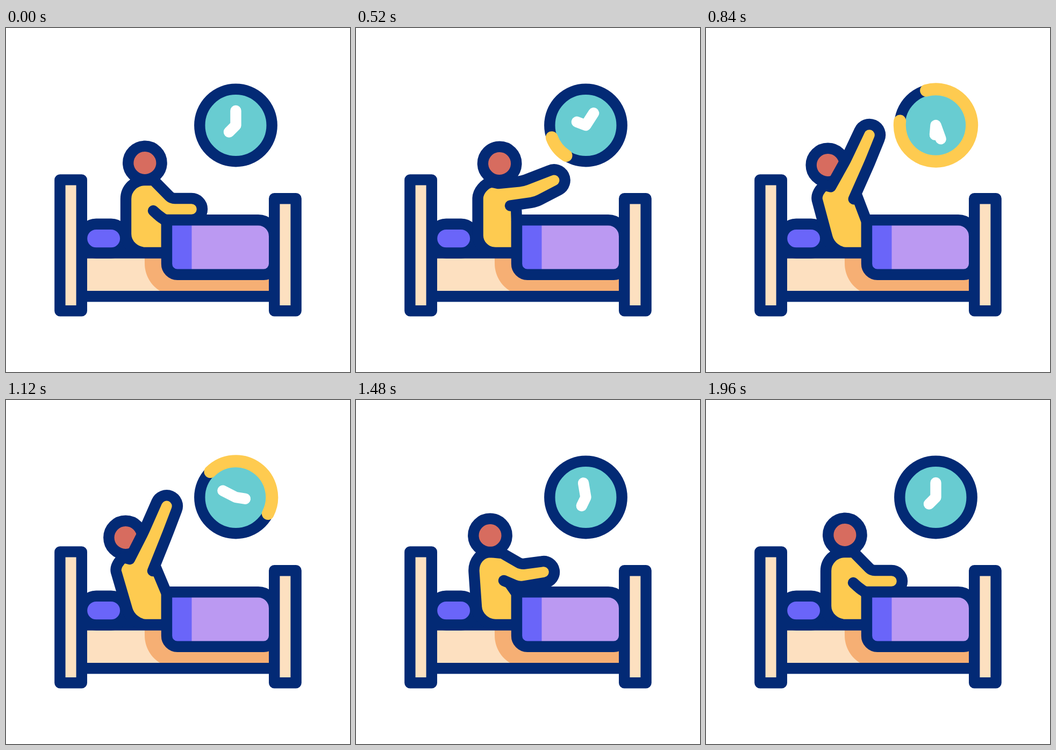
Animation of 640x640 px, one loop 2.04 s. Source, as an HTML page:

```html
<!DOCTYPE html>
<html lang="en">
<head>
<meta charset="utf-8">
<title>Good morning</title>
<style>
  html, body { margin: 0; width: 100%; height: 100%; overflow: hidden; background: #fff; }
  svg { display: block; width: 100%; height: 100%; }
  .line { stroke: #032a75; stroke-width: 20.4; stroke-linecap: round; stroke-linejoin: round; }
</style>
</head>
<body>
<svg viewBox="0 0 640 640">
  <!-- clock -->
  <circle class="line" cx="427.5" cy="181" r="67.2" fill="#68ccd1"/>
  <path id="ring" fill="none" stroke="#fecb50" stroke-width="23" stroke-linecap="round"/>
  <path id="hands" fill="none" stroke="#fff" stroke-width="20.4" stroke-linecap="round" stroke-linejoin="round"/>

  <!-- mattress and pillow -->
  <path fill="#fde0c0" d="M145 425H495V495H145Z"/>
  <path fill="#f6af74" d="M258 425V438C258 460 270 480 288 490H495V425Z"/>
  <path class="line" d="M145 499.3H495M145 418.5H299"/>
  <rect class="line" x="141" y="364.8" width="81.3" height="53.7" rx="26.8" fill="#6a65f9"/>

  <circle id="head" class="line" r="31.2" fill="#d76c5f"/>
  <path id="body" class="line" fill="#fecb50"/>

  <!-- blanket -->
  <path fill="#bb99f2" d="M299 357H469A30 30 0 0 1 499 387V459H299Z"/>
  <path fill="#6a65f9" d="M299 357H345.5V459H319L299 439Z"/>
  <path class="line" fill="none" d="M299 357.3H469A30 30 0 0 1 499.2 387.5V438.6A20 20 0 0 1 479 458.8H319A20 20 0 0 1 299 438.6Z"/>

  <!-- head and foot boards -->
  <rect class="line" x="100.4" y="282.4" width="40.4" height="243.8" fill="#fde0c0"/>
  <rect class="line" x="499.2" y="317.2" width="40.4" height="209" fill="#fde0c0"/>
</svg>
<script>
const LOOP = 2040, STEP = 40;
const $ = id => document.getElementById(id);
const mix = (a, b, k) => a + (b - a) * k;
const mixPt = (a, b, k) => [mix(a[0], b[0], k), mix(a[1], b[1], k)];
const polar = ([x, y], r, a) => [x + r * Math.cos(a), y + r * Math.sin(a)];
const toward = (a, b, d) => mixPt(a, b, d / Math.hypot(b[0] - a[0], b[1] - a[1]));
const str = p => p.map(v => v.toFixed(2)).join(' ');
const rad = deg => deg * Math.PI / 180;

// Smooth curve through keys that never overshoots them
function track(times, values) {
  const n = times.length;
  const h = i => times[i + 1] - times[i];
  const rate = i => (values[i + 1] - values[i]) / h(i);
  const slopes = values.map((_, i) => {
    if (!i || i === n - 1) return 0;
    const a = rate(i - 1), b = rate(i);
    if (a * b <= 0) return 0;
    const m = (a * h(i) + b * h(i - 1)) / (h(i) + h(i - 1));
    return Math.sign(m) * Math.min(Math.abs(m), 3 * Math.abs(a), 3 * Math.abs(b));
  });
  return t => {
    if (t >= times[n - 1]) return values[n - 1];
    let i = 0;
    while (t >= times[i + 1]) i++;
    const w = h(i), s = (t - times[i]) / w, r = 1 - s;
    return values[i] * r * r * (1 + 2 * s) + slopes[i] * w * s * r * r
         + values[i + 1] * s * s * (3 - 2 * s) - slopes[i + 1] * w * s * s * r;
  };
}

function smooth(from, to, t) {
  const s = Math.min(1, Math.max(0, (t - from) / (to - from)));
  return s * s * (3 - 2 * s);
}

// head, hip, back, shoulder corner, nape, arm root, armpit, elbow, hand, under-elbow, forearm angle
const rest   = [258.4, 251, 223, 383, 223, 318, 223, 283, 258, 283, 274.5, 283, 274, 340, 308, 317, 345, 337, 293, 357, 0];
const lean   = [281, 253, 227, 382, 235, 313, 238, 283, 269, 283, 284, 285.5, 289, 341, 321, 314, 360, 337, 311, 354, 4];
const reach  = [244.3, 251, 226, 390, 214, 320, 212, 303, 229, 291, 240, 293, 282, 319, 272, 254, 324, 207, 320, 260, -63];
const back   = [222.5, 256, 225.5, 390, 205, 320, 201, 304, 219, 293, 230, 296, 273, 318, 256, 245, 299, 197, 301, 248, -67];
const settle = [249.5, 252, 224, 385, 219.5, 320, 217, 283, 250, 283, 272, 285, 275, 336, 307.5, 305.5, 349, 320, 303, 348, -9.5];

const pivotOf = p => [(p[10] + p[12]) / 2, (p[11] + p[13]) / 2];

// The arm swings, so its joints are kept as radius and angle about the shoulder
function swing(pose) {
  const p = pose.slice(), [px, py] = pivotOf(p);
  for (let i = 14; i < 20; i += 2) {
    const dx = pose[i] - px, dy = pose[i + 1] - py;
    p[i] = Math.hypot(dx, dy);
    p[i + 1] = Math.atan2(dy, dx);
  }
  return p;
}

const almostBack = reach.map((v, i) => mix(v, back[i], 0.8));
const poses = [rest, lean, reach, almostBack, back, settle, rest].map(swing);
const poseTimes = [0, 360, 680, 840, 1120, 1480, 1800];
const poseTracks = rest.map((_, i) => track(poseTimes, poses.map(p => p[i])));
const turn = track([0, 360, 680, 840, 1120, 1480, 1960], [0, 13, 77, 160, 297, 350.5, 360]);

const bend = (a, corner, b) =>
  `C${str(mixPt(a, corner, 0.55))} ${str(mixPt(b, corner, 0.55))} ${str(b)}`;
const soften = (a, corner, b, r) =>
  `L${str(toward(corner, a, r))}Q${str(corner)} ${str(toward(corner, b, r))}`;

function drawPerson(t) {
  const p = poseTracks.map(f => f(t));
  const pt = i => [p[i], p[i + 1]];
  const pivot = pivotOf(p);
  const joint = i => polar(pivot, p[i], p[i + 1]);
  const hip = pt(2), spine = pt(4), nape = pt(8), root = pt(10), pit = pt(12);
  const elbow = joint(14), hand = joint(16), under = joint(18);
  const angle = rad(p[20]);
  const over = polar(hand, 20, angle - Math.PI / 2);
  const below = polar(hand, 20, angle + Math.PI / 2);
  const seat = [260, 418];
  const corner = mixPt(spine, hip, (418 - spine[1]) / (hip[1] - spine[1]));

  $('head').setAttribute('cx', p[0]);
  $('head').setAttribute('cy', p[1]);
  $('body').setAttribute('d',
    `M299 418L${str(seat)}` + bend(seat, corner, hip) +
    `L${str(spine)}` + bend(spine, pt(6), nape) + `L${str(root)}` +
    soften(root, elbow, over, 6) + `L${str(over)}A20 20 0 0 1 ${str(below)}` +
    soften(below, under, pit, 9) +
    `L${str(pit)}L${str(toward(pit, under, 11))}L299 360Z`);
}

function drawClock(t) {
  const centre = [427.5, 181];
  const at = (r, deg) => polar(centre, r, rad(deg - 90));
  const angle = turn(t);
  $('hands').setAttribute('d',
    `M${str(at(27, angle))}L${str(centre)}L${str(at(17.7, 225 + 2 * angle))}`);

  const start = 360 * smooth(800, 1400, t), end = 360 * smooth(400, 1000, t);
  const span = end - start, base = 180 + angle;
  $('ring').setAttribute('d', span < 0.01 ? '' :
    `M${str(at(67.2, base + start))}A67.2 67.2 0 ${span > 180 ? 1 : 0} 1 ${str(at(67.2, base + end))}`);
}

const began = performance.now();
function frame() {
  const elapsed = Math.max(0, performance.now() - began) % LOOP;
  const t = Math.min(1960, Math.floor(elapsed / STEP) * STEP);
  drawPerson(t);
  drawClock(t);
  requestAnimationFrame(frame);
}
frame();
</script>
</body>
</html>
```
